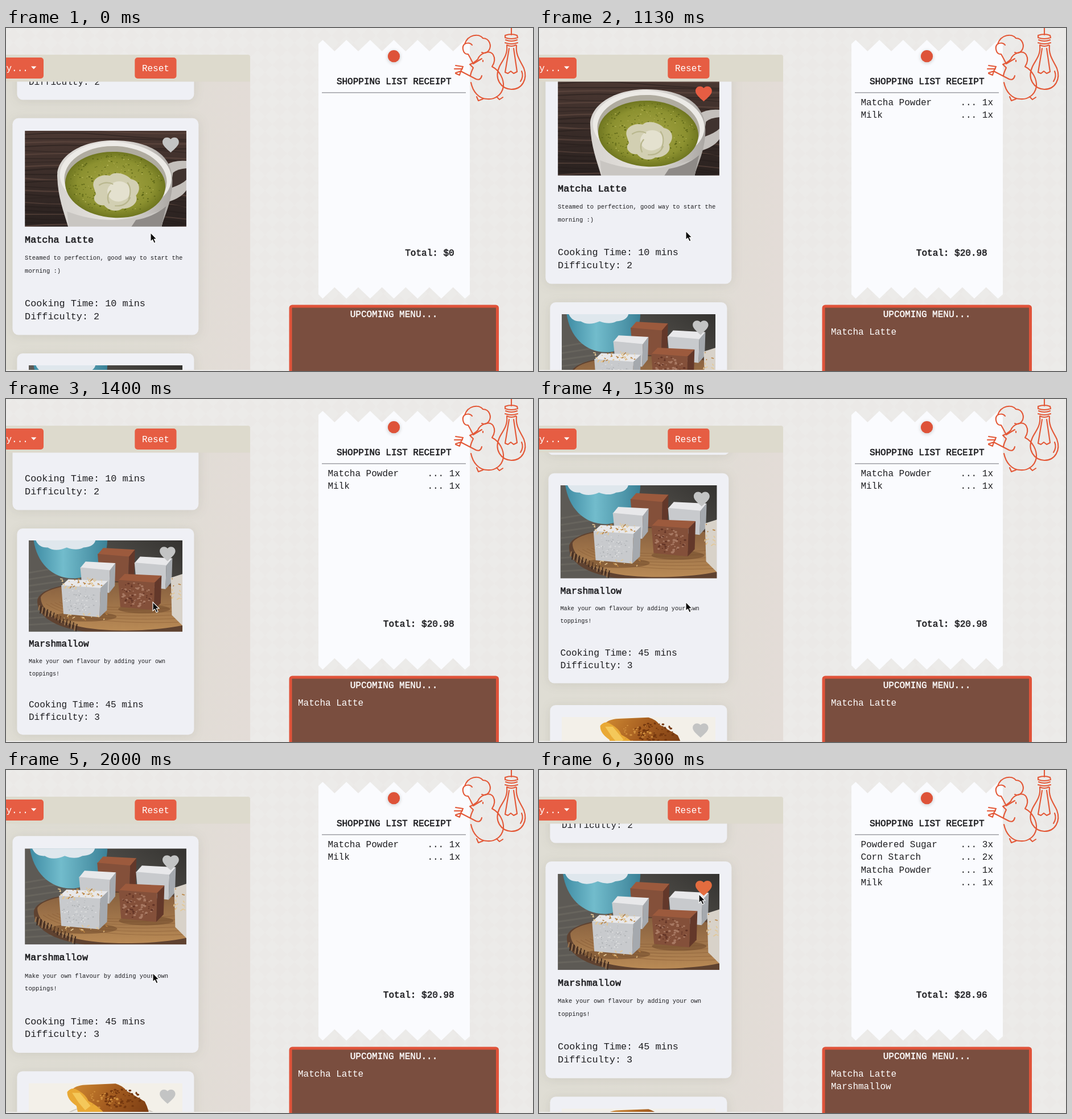
These frames come from a looping animation (926 px wide and 604 px high, 4340 ms). An HTML page:

```html
<!DOCTYPE html>
<html lang="en">
<head>
<meta charset="utf-8">
<title>Recipe board</title>
<style>
  html, body { margin: 0; width: 100%; height: 100%; overflow: hidden; background: #ecebe9; }
  svg { display: block; width: 100vw; height: 100vh; }
  text { font: 16px "Liberation Mono", monospace; fill: #1d1d20; white-space: pre; }
  .bold { stroke: #1d1d20; stroke-width: .6; }
  .small { font-size: 10px; }
  .light { fill: #fff; }
  .light.bold { stroke: #fff; stroke-width: .4; }
  .end { text-anchor: end; }
  .mid { text-anchor: middle; }
  .card { filter: drop-shadow(0 2px 9px rgba(60, 55, 40, .1)); }
  .ink { fill: none; stroke: #e35837; stroke-width: 2.1; stroke-linecap: round; stroke-linejoin: round; }
</style>
</head>
<body>
<svg viewBox="0 0 926 604">
  <defs>
    <pattern id="weave" width="26" height="26" patternUnits="userSpaceOnUse">
      <path d="M13 0L26 13L13 26L0 13Z" fill="#e6dfdc" opacity=".1"/>
    </pattern>
    <linearGradient id="panel">
      <stop offset="0" stop-color="#dfddd4"/>
      <stop offset=".65" stop-color="#e0ddd5"/>
      <stop offset="1" stop-color="#e3dcd7"/>
    </linearGradient>
    <linearGradient id="wood" x2="0" y2="1">
      <stop offset="0" stop-color="#4b3832"/>
      <stop offset="1" stop-color="#29211f"/>
    </linearGradient>
    <linearGradient id="cup">
      <stop offset="0" stop-color="#d6d3cf"/>
      <stop offset=".5" stop-color="#e6e3df"/>
      <stop offset="1" stop-color="#aaa6a2"/>
    </linearGradient>
    <radialGradient id="tea">
      <stop offset="0" stop-color="#a5a544"/>
      <stop offset=".75" stop-color="#8c9130"/>
      <stop offset="1" stop-color="#6f7620"/>
    </radialGradient>
    <linearGradient id="bowl">
      <stop offset="0" stop-color="#3f8ca4"/>
      <stop offset=".4" stop-color="#72bccc"/>
      <stop offset="1" stop-color="#3b8197"/>
    </linearGradient>
    <linearGradient id="board" x2="0" y2="1">
      <stop offset="0" stop-color="#87603f"/>
      <stop offset="1" stop-color="#b98a55"/>
    </linearGradient>
    <linearGradient id="backdrop" x2=".7" y2="-.6">
      <stop offset="0" stop-color="#5d5a55"/>
      <stop offset="1" stop-color="#2b2a28"/>
    </linearGradient>
    <linearGradient id="toast" x2="1" y2=".4">
      <stop offset="0" stop-color="#d08a32"/>
      <stop offset=".5" stop-color="#a55d20"/>
      <stop offset="1" stop-color="#7e3f14"/>
    </linearGradient>
    <clipPath id="photo"><path d="M0 0H283.5V168.7H0Z"/></clipPath>
    <clipPath id="view"><path d="M0 94H429V602H0Z"/></clipPath>
    <filter id="soft" x="-50%" y="-50%" width="200%" height="200%"><feGaussianBlur stdDeviation="2.5"/></filter>
    <filter id="lens"><feGaussianBlur stdDeviation=".6"/></filter>
  </defs>

  <path d="M0 0H926V604H0Z" fill="#ecebe9"/>
  <path d="M0 0H926V604H0Z" fill="url(#weave)"/>
  <path d="M0 90H429V602H0Z" fill="url(#panel)"/>
  <path d="M340 94H429V602H340Z" fill="url(#weave)"/>
  <g id="cards" clip-path="url(#view)"></g>

  <path d="M0 47H425Q429 47 429 51V94.500H0Z" fill="#dddacd"/>
  <g fill="#e65d43">
    <rect x="-60" y="52" width="126" height="37" rx="5"/>
    <rect x="226.300" y="52" width="73.200" height="37" rx="5"/>
  </g>
  <text class="light" x="0.500" y="76">y...</text>
  <path d="M44 67.500H53.400L48.700 72.500Z" fill="#fff"/>
  <text class="light" x="238.900" y="76">Reset</text>

  <path id="paper" fill="#fafbfe"/>
  <circle cx="681.500" cy="51" r="12" fill="#777" opacity=".25" filter="url(#soft)"/>
  <circle cx="681.500" cy="49.700" r="10.600" fill="#de5339"/>
  <text class="bold mid" x="681.700" y="99">SHOPPING LIST RECEIPT</text>
  <path d="M555 113.800H808" stroke="#8d8e93" stroke-width="1.200"/>
  <g id="items"></g>
  <text id="total" class="bold end" x="787.700" y="401"></text>

  <rect x="500" y="490" width="363.500" height="140" rx="3" fill="#7a4e3f" stroke="#e0533a" stroke-width="5"/>
  <text class="light bold mid" x="681.500" y="509">UPCOMING MENU...</text>
  <g id="menu"></g>

  <g class="ink">
    <path d="M821 63Q816 53 812 46C803 47 800 33 806 28C812 25 817 27 819 30M806 28C812 11 831 9 838 18C850 18 854 32 848 40Q843 46 836 43M821 63Q829 58 836 54"/>
    <path d="M829 55C833 44 850 38 856 47C860 54 858 62 854 68C868 75 875 91 874 103C871 120 857 126 846 125C830 125 820 111 817 96M829 55Q822 62 815 64L821 70Q817 78 816 84"/>
    <path d="M838 57V59M827 121L830 128L838 125M862 121L867 126L873 122"/>
    <path d="M799 76L826 90Q834 93 836 84M799 76L803 68L790 66M799 76L790 79M802 72L788 72M799 76L797 83L790 80"/>
    <path d="M888 0V12M877 13Q888 9 898 13L899 17Q888 21 877 17ZM878 21Q888 25 898 21M877 26Q888 30 899 26M880 30Q888 34 896 30"/>
    <path d="M880 31C882 48 872 57 867 68C857 90 870 107 888 108C907 108 917 90 910 71C904 58 895 48 897 31M884 36L877 78L882 80L887 76L892 80L898 77L892 36M906 76Q910 85 904 94"/>
  </g>

  <path id="pointer" d="M0 0V15.500L3.500 12.300L6.200 18.300L9 17L6.400 11.300H11Z" fill="#0b0b0b" stroke="#fff" stroke-width="1.100"/>
</svg>
<script>
const $ = id => document.getElementById(id);
const LOOP = 4340, PITCH = 404.9, CARD_W = 311, CARD_H = 363.2;

let seed = 11;
const random = () => (seed = seed * 16807 % 2147483647) / 2147483647;
const repeat = (count, make) => Array.from({ length: count }, (_, i) => make(i)).join('');
const shape = (d, fill) => `<path d="${d}" fill="${fill}"/>`;
const oval = (x, y, rx, ry, fill, extra = '') =>
  `<ellipse cx="${x}" cy="${y}" rx="${rx}" ry="${ry}" fill="${fill}" ${extra}/>`;
const label = (text, x, y, style = '') => `<text x="${x}" y="${y}" class="${style}">${text}</text>`;

// Specks scattered inside an ellipse
const specks = (count, x, y, rx, ry, size, fill) => repeat(count, () => {
  const angle = random() * 2 * Math.PI, reach = Math.sqrt(random());
  const r = size * (.4 + random() * .6);
  return oval((x + rx * reach * Math.cos(angle)).toFixed(1),
    (y + ry * reach * Math.sin(angle)).toFixed(1), r.toFixed(1), (r * .7).toFixed(1), fill);
});

const cube = (x, y, w, h, top, front, side) =>
  shape(`M${x} ${y + 12}L${x + w * .15} ${y}L${x + w} ${y + 3}L${x + w * .84} ${y + 17}Z`, top) +
  shape(`M${x} ${y + 11}L${x + w * .84} ${y + 16}L${x + w * .82} ${y + h}L${x + 4} ${y + h - 6}Z`, front) +
  shape(`M${x + w * .84} ${y + 16}L${x + w} ${y + 3}L${x + w * .98} ${y + h - 13}L${x + w * .82} ${y + h}Z`, side);

function latte() {
  return shape('M0 0H284V169H0Z', 'url(#wood)') +
    repeat(26, i => `<path d="M0 ${i * 7}q70 ${random() * 14 - 7} 140 0t144 ${random() * 10}" fill="none"
      stroke="${i % 3 ? '#241c1b' : '#6b5047'}" stroke-width="${1 + random() * 2}" opacity=".5"/>`) +
    shape('M246 61Q262 51 284 53V104Q275 118 252 125Z', '#c4c0bc') +
    shape('M260 74Q268 67 284 66V86Q276 94 256 101Z', '#40332f') +
    shape('M57 82C54 48 95 17 155 17C220 17 259 43 259 88C259 125 245 148 240 169H76C68 142 58 116 57 82Z', 'url(#cup)') +
    `<g transform="rotate(3 158 90)">${oval(159, 81, 98, 61, '#eceae6')}${oval(159, 87, 90, 60, '#b0aca0')}
     ${oval(159, 95, 88, 58, 'url(#tea)')}</g>` +
    specks(180, 159, 94, 82, 53, 1.7, '#5f6818') +
    specks(70, 159, 94, 80, 51, 1.4, '#b8b85c') +
    shape('M121 100C116 84 134 76 149 79C158 70 178 76 186 85C203 88 204 105 195 114C201 127 185 138 171 137C159 145 145 139 139 131C126 133 116 119 125 112Z', '#d2cfb2') +
    shape('M145 104C149 89 168 85 178 93C190 101 185 119 174 122C160 130 143 119 145 104Z', '#e4e1cf') +
    `<path d="M130 96Q142 88 155 94M148 128Q142 115 151 105M180 91Q189 103 182 121M158 132Q178 134 185 117"
      fill="none" stroke="#b9b78e" stroke-width="2.2"/>` +
    shape('M74 142Q156 174 247 137L240 169H77Z', '#c9c6c2') +
    shape('M195 157Q225 152 248 133L240 169H187Z', '#8e8a87');
}

function marshmallows() {
  const white = ['#e8e8ea', '#c8cacd', '#a5a9ae'], cocoa = ['#9c5a3d', '#84503a', '#63382a'];
  return shape('M0 0H284V169H0Z', 'url(#backdrop)') +
    repeat(9, i => `<path d="M0 ${60 + i * 12}L70 ${48 + i * 13}" stroke="#77736a" stroke-width="3" opacity=".4"/>`) +
    shape('M9 0H145C144 36 124 66 87 70C45 73 15 42 9 0Z', 'url(#bowl)') +
    shape('M13 0H123Q120 12 101 13Q88 20 70 13Q49 22 35 13Q19 14 13 0Z', '#dfe7ed') +
    shape('M16 110C22 86 78 77 150 76C220 73 262 80 284 87V169H105C60 163 13 145 16 110Z', '#5f4230') +
    shape('M22 105C31 86 89 79 150 78C219 76 260 83 284 91V157C234 168 139 171 88 158C49 147 22 128 22 105Z', 'url(#board)') +
    repeat(6, i => `<path d="M${32 + i * 8} ${117 - i}Q${90 + i * 8} ${158 - i * 5} 284 ${151 - i * 7}" fill="none" stroke="#805430" opacity=".5"/>`) +
    repeat(24, i => `<path d="M${20 + i * 3} ${120 + i * 1.5}l-2 ${8 + random() * 6}" stroke="${i % 2 ? '#402c20' : '#9b7650'}" stroke-width="2"/>`) +
    cube(127, 14, 69, 64, ...cocoa) + cube(195, 30, 70, 60, ...white) + cube(95, 39, 65, 58, ...white) +
    oval(104, 141, 58, 9, '#70492b', 'opacity=".55"') + oval(213, 127, 48, 8, '#70492b', 'opacity=".55"') +
    cube(60, 72, 86, 70, ...white) + cube(165, 62, 80, 67, ...cocoa) +
    shape('M262 69L284 62V158L264 138Z', '#d8d2c9') +
    specks(45, 198, 98, 30, 24, 3, '#a87963') + specks(30, 198, 98, 30, 24, 2.5, '#643527') +
    specks(45, 95, 112, 31, 22, 1.5, '#aeb1b4') + specks(35, 95, 112, 31, 22, 1.7, '#dcddde') +
    repeat(75, i => {
      const x = i < 45 ? 60 + random() * 78 : i < 60 ? 62 + random() * 95 : 262 + random() * 20;
      const y = i < 45 ? 70 + random() * 17 : i < 60 ? 132 + random() * 16 : 70 + random() * 38;
      return `<path d="M${x} ${y}l${random() * 10 - 5} ${random() * 7 - 2}" stroke="${i % 3 ? '#e3c795' : '#b98342'}" stroke-width="1.700"/>`;
    });
}

function toastie() {
  return shape('M0 0H284V169H0Z', '#f3f0e9') +
    oval(152, 92, 110, 55, '#c9c4bb') + oval(152, 90, 104, 52, '#efece6') +
    shape('M80 12Q88 3 110 3L160 1Q174 5 180 14L214 34Q230 64 218 100L110 72Z', 'url(#toast)') +
    shape('M71 16Q80 5 92 14Q106 22 110 33Q128 42 142 58L185 100L95 76L88 42Q70 30 71 16Z', '#e9a935') +
    shape('M80 18L94 18L114 42L104 50L92 36Z', '#f4c85a') +
    specks(60, 170, 28, 38, 18, 3, '#75380f') + specks(30, 140, 30, 30, 20, 2.5, '#d2913f');
}

const HEART = 'M12 21.35l-1.45-1.32C5.4 15.36 2 12.28 2 8.5 2 5.42 4.42 3 7.5 3c1.74 0 3.41.81 4.5 2.09' +
  'C13.09 3.81 14.76 3 16.5 3 19.58 3 22 5.42 22 8.5c0 3.78-3.4 6.86-8.55 11.54z';
const recipes = [
  { name: '', about: [], mins: 30, level: 2, photo: () => '' },
  { name: 'Matcha Latte', about: ['Steamed to perfection, good way to start the', 'morning :)'], mins: 10, level: 2, photo: latte },
  { name: 'Marshmallow', about: ['Make your own flavour by adding your own', 'toppings!'], mins: 45, level: 3, photo: marshmallows },
  { name: '', about: [], mins: 15, level: 1, photo: toastie }
];

$('cards').innerHTML = recipes.map(r => `<g class="card">
  <rect width="${CARD_W}" height="${CARD_H}" rx="10" fill="#eff0f5"/>
  <g transform="translate(20.600 21) scale(.9524)" clip-path="url(#photo)"><g filter="url(#lens)">${r.photo()}</g></g>
  <path class="heart" d="${HEART}" transform="translate(248 28.200) scale(1.370)"/>
  ${label(r.name, 20.6, 208.4, 'bold')}
  ${r.about.map((line, i) => label(line, 20.6, 237.2 + i * 21.6, 'small')).join('')}
  ${label(`Cooking Time: ${r.mins} mins`, 20.6, 315.2)}
  ${label(`Difficulty: ${r.level}`, 20.6, 336.8)}
</g>`).join('');

const teeth = Array.from({ length: 13 }, (_, i) => [556.5 + i * 20.83, i % 2 * 20]);
$('paper').setAttribute('d', 'M549 28L' + teeth.map(([x, dy]) => `${x} ${21 + dy}`).join('L') +
  'L815 28V469L' + teeth.reverse().map(([x, dy]) => `${x} ${476.5 - dy}`).join('L') + 'L549 469Z');

const stages = [
  { items: [], total: '$0', menu: [] },
  { items: [['Matcha Powder', 1], ['Milk', 1]], total: '$20.98', menu: ['Matcha Latte'] },
  { items: [['Powdered Sugar', 3], ['Corn Starch', 2], ['Matcha Powder', 1], ['Milk', 1]],
    total: '$28.96', menu: ['Matcha Latte', 'Marshmallow'] }
];

// Keys are [tick, value], 15 ticks per second
const scrollKeys = [[14, 0], [15, 12], [17, 90], [19, 200], [21, 345], [22, 402], [23, 439], [25, 444], [30, 447.5],
  [31, 445], [33, 427], [35, 406], [36, 402.7]];
const hoverKeys = [[22, 0], [23, .36], [24, .64], [25, .83], [27, 1]];
const pointerX = [[0, 254], [2, 258], [30, 258], [36, 279], [38, 281]];
const pointerY = [[0, 360.5], [2, 357.5], [30, 357.5], [32, 335], [34, 270], [36, 230.5], [38, 218.5]];

function at(keys, tick) {
  const next = keys.findIndex(k => k[0] > tick);
  if (next === 0) return keys[0][1];
  if (next < 0) return keys[keys.length - 1][1];
  const [t0, a] = keys[next - 1], [t1, b] = keys[next];
  return a + (b - a) * (tick - t0) / (t1 - t0);
}

const cards = [...document.querySelectorAll('.card')];
const hearts = [...document.querySelectorAll('.heart')];
let shown = -1;

function showStage(index) {
  if (index === shown) return;
  shown = index;
  const { items, total, menu } = stages[index];
  $('items').innerHTML = items.map(([name, count], i) =>
    label(name, 565.4, 136.3 + i * 22.1) + label(`... ${count}x`, 798, 136.3 + i * 22.1, 'end')).join('');
  $('total').textContent = `Total: ${total}`;
  $('menu').innerHTML = menu.map((name, i) => label(name, 513, 539.5 + i * 22.3, 'light')).join('');
  hearts.forEach((heart, i) => heart.setAttribute('fill',
    i === 1 && index > 0 ? '#e65d43' : i === 2 && index > 1 ? '#e36c3f' : '#c3c4c4'));
}

function draw(now) {
  const tick = Math.floor(now % LOOP * .015 + .05);
  const scroll = at(scrollKeys, tick), hover = at(hoverKeys, tick);
  const lift = [0, 1 - hover, hover, 0];
  cards.forEach((card, i) => {
    const scale = 1 + .051 * lift[i];
    const x = 19.4 - (scale - 1) * CARD_W / 2;
    const y = 168.1 + (i - 1) * PITCH - scroll - (scale - 1) * CARD_H / 2;
    card.setAttribute('transform', `translate(${x} ${y}) scale(${scale})`);
  });
  $('pointer').setAttribute('transform', `translate(${at(pointerX, tick)} ${at(pointerY, tick)})`);
  showStage(tick < 11 ? 0 : tick < 40 ? 1 : 2);
}

const start = performance.now();
function frame() {
  draw(performance.now() - start);
  requestAnimationFrame(frame);
}
frame();
</script>
</body>
</html>
```
